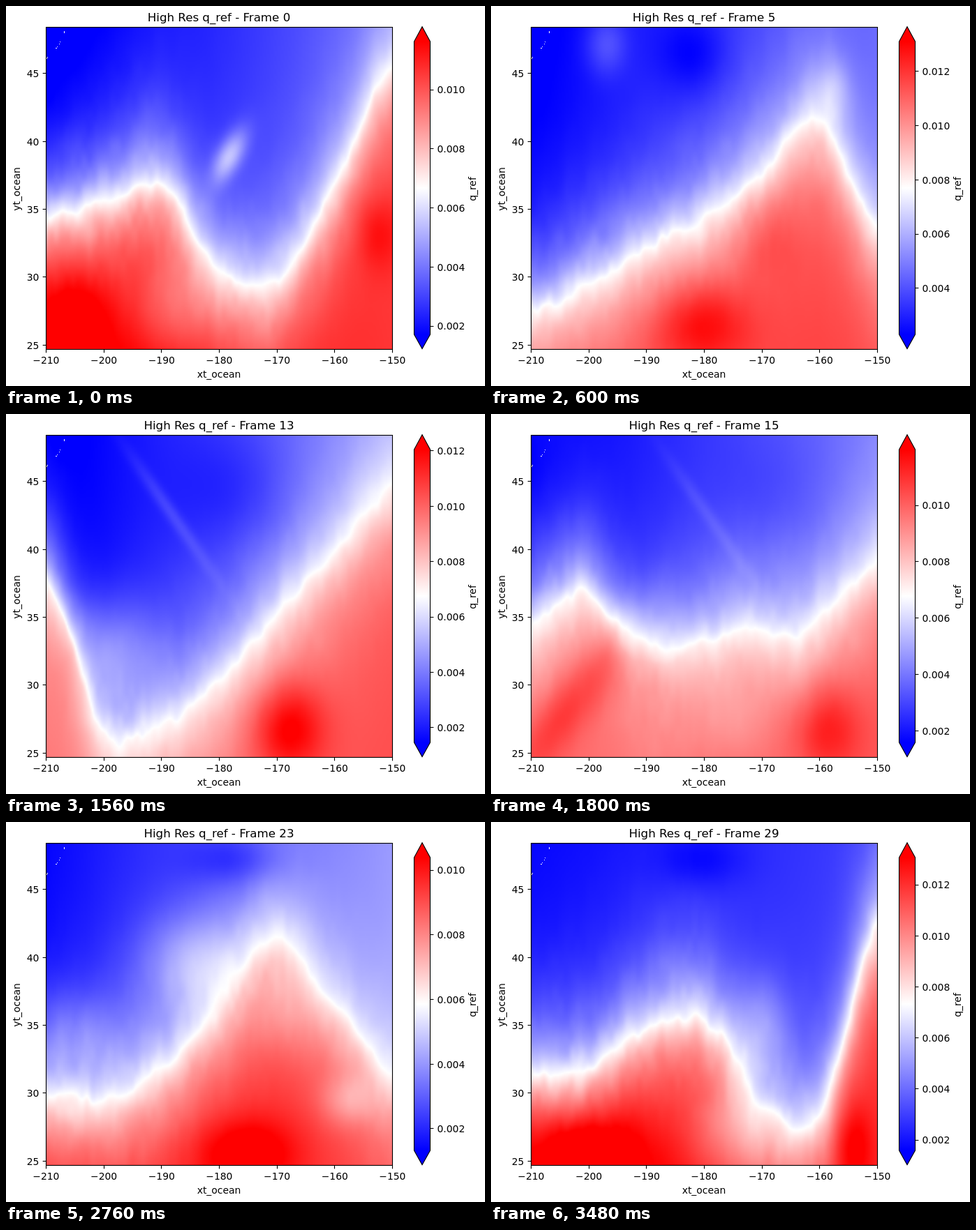
Write an HTML page with a canvas that moves like this. It is 686x545 px and loops after 3600 ms.

```html
<!DOCTYPE html>
<html lang="en">
<head>
<meta charset="utf-8">
<title>High Res q_ref</title>
<style>
  html, body { margin: 0; width: 100%; height: 100%; overflow: hidden; background: #fff; }
  canvas { position: absolute; left: 57px; top: 30px; width: 496px; height: 462px; }
  svg { position: absolute; left: 0; top: 0; }
  text { font: 13.89px "DejaVu Sans", sans-serif; }
  .title { font-size: 16.67px; }
  .mid { text-anchor: middle; }
  .end { text-anchor: end; }
  .line { fill: none; stroke: #000; stroke-width: 1.11; }
</style>
</head>
<body>
<canvas id="field" width="248" height="231"></canvas>
<svg width="686" height="545">
  <defs>
    <linearGradient id="bwr" gradientUnits="userSpaceOnUse" x1="0" y1="51" x2="0" y2="471">
      <stop offset="0" stop-color="#f00"/><stop offset=".5" stop-color="#fff"/><stop offset="1" stop-color="#00f"/>
    </linearGradient>
  </defs>
  <path fill="#fff" d="M57 76h1v3h-1zM58 74h1v2h-1zM59 73h1v1h-1zM71 60h2v1h-2zM73 58h1v1h-1zM76 54h1v1h-1zM77 51h1v1h-1zM83 36h1v3h-1z"/>
  <rect class="line" x="57.5" y="30.5" width="496" height="462"/>
  <path class="line" style="fill:url(#bwr)" d="M584.5 51 596 29.7 607.5 51V471L596 491.7 584.5 471Z"/>
  <g id="axes"></g>
  <g id="bar"></g>
  <text class="title mid" id="title" x="305" y="22"></text>
  <text class="mid" x="305" y="533">xt_ocean</text>
  <text class="mid" transform="translate(20 262.5) rotate(-90)">yt_ocean</text>
  <text class="mid" transform="translate(673 262.5) rotate(-90)">q_ref</text>
</svg>
<script>
const STEP = 120, FRAMES = 30, W = 248, H = 231;
const LEFT = 57, RIGHT = 553, GAP = (RIGHT - LEFT) / 6;
const SPEED = 36;                        // eastward travel per frame, px
const COLD_DEPTH = 85, WARM_DEPTH = 90;  // how fast the air changes away from the front, px

const $ = id => document.getElementById(id);
const clamp = (v, a, b) => Math.max(a, Math.min(b, v));
const mix = (a, b, t) => a + (b - a) * t;

// front: height of the white line at each longitude tick.
// cold, warm: strength of the air above and below it at the west and east edges.
// blobs: x, y, rx, ry, amount, shear.
const poses = [
  { frame: 0, range: [1.72, 11.63], front: [305, 283, 257, 377, 390, 258, 85], cold: [1.15, .55], warm: [1.2, .8],
    blobs: [[320, 215, 20, 38, .5, -.4], [235, 430, 55, 75, -.3], [95, 450, 45, 70, .25], [535, 325, 35, 55, .2]] },
  { frame: 5, range: [2.3, 13.1], front: [440, 397, 350, 308, 240, 168, 315], cold: [1.05, .6], warm: [.75, .75],
    blobs: [[300, 455, 65, 60, .35], [290, 70, 50, 60, -.2], [165, 55, 30, 45, .25], [490, 120, 25, 45, .2], [395, 330, 40, 60, .15]] },
  { frame: 9, range: [2.36, 11], front: [318, 272, 243, 377, 345, 297, 232], cold: [1.1, .72], warm: [1, 1.4],
    blobs: [[260, 440, 90, 80, -.42], [262, 225, 28, 40, .3]] },
  { frame: 13, range: [1.47, 12.05], front: [245, 458, 448, 385, 290, 195, 105], cold: [1.1, .4], warm: [.55, .7],
    blobs: [[405, 450, 50, 65, .45], [150, 340, 70, 80, .35], [330, 110, 90, 90, -.15], [235, 140, 12, 85, .15, .68]] },
  { frame: 18, range: [1.76, 11.88], front: [385, 365, 282, 213, 182, 180, 330], cold: [1, .6], warm: [.7, .65],
    blobs: [[238, 400, 42, 110, .55, -.65], [460, 440, 40, 50, -.22], [320, 400, 40, 80, .15], [95, 440, 30, 25, -.2], [130, 90, 90, 70, -.15]] },
  { frame: 23, range: [1.33, 10.39], front: [395, 397, 355, 270, 172, 255, 360], cold: [1, .4], warm: [1, .75],
    blobs: [[345, 475, 70, 50, .35], [395, 270, 60, 70, -.2], [490, 400, 40, 35, -.25], [270, 200, 80, 70, .35], [330, 55, 70, 35, -.2], [100, 300, 80, 60, .2]] },
  { frame: 29, range: [1.59, 13.07], front: [362, 353, 294, 284, 390, 415, 150], cold: [1, .75], warm: [1.25, .85],
    blobs: [[130, 465, 70, 50, .35], [345, 450, 70, 80, -.35], [520, 465, 25, 60, .25], [385, 290, 40, 70, .25], [300, 55, 60, 40, -.15]] }
];

const hash = (x, y) => {
  const s = Math.sin(x * 127.1 + y * 311.7) * 43758.5453;
  return s - Math.floor(s);
};
function noise(x, y) {
  const i = Math.floor(x), j = Math.floor(y), ease = t => t * t * (3 - 2 * t);
  const u = ease(x - i), v = ease(y - j);
  return mix(mix(hash(i, j), hash(i + 1, j), u), mix(hash(i, j + 1), hash(i + 1, j + 1), u), v) - .5;
}

// Catmull-Rom spline through evenly spaced values.
function spline(ys, c) {
  const i = Math.min(ys.length - 2, Math.floor(c)), f = c - i;
  const [p, q, r, s] = [-1, 0, 1, 2].map(k => ys[clamp(i + k, 0, ys.length - 1)]);
  return q + f / 2 * (r - p + f * (2 * p - 5 * q + 4 * r - s + f * (3 * (q - r) + s - p)));
}

// Front height, cold strength and warm strength at x.
function column(pose, x) {
  const c = clamp((x - LEFT) / GAP, 0, 6);
  return [spline(pose.front, c), mix(...pose.cold, c / 6), mix(...pose.warm, c / 6)];
}

const bump = (blobs, x, y) => blobs.reduce((sum, [bx, by, rx, ry, amount, shear = 0]) => {
  const dy = y - by, u = (x - bx - shear * dy) / rx, v = dy / ry, d = u * u + v * v;
  return d < 7 ? sum + amount * Math.exp(-d) : sum;
}, 0);

const ctx = $("field").getContext("2d"), img = ctx.createImageData(W, H);

function drawField(a, b, t, n) {
  const goneA = SPEED * (n - a.frame), goneB = SPEED * (n - b.frame);
  for (let i = 0; i < W; i++) {
    const x = LEFT + 1 + i * 2, xa = x - goneA, xb = x - goneB;
    // Trust the pose that still has data upstream or downstream of this column.
    const wa = (1 - t) / (1 + Math.max(0, LEFT - xa) / 50);
    const wb = t / (1 + Math.max(0, xb - RIGHT) / 50);
    const w = wb / (wa + wb), colB = column(b, xb);
    const [front, cold, warm] = column(a, xa).map((v, k) => mix(v, colB[k], w));
    for (let j = 0; j < H; j++) {
      const y = 31 + j * 2, nx = x - n * SPEED;
      const d = y - front + 14 * noise(nx / 17, y / 48) + 7 * noise(nx / 8 + 40, y / 22);
      let v = d < 0 ? cold * (Math.exp(d / COLD_DEPTH) - 1) : warm * (1 - Math.exp(-d / WARM_DEPTH));
      if (w < 1) v += (1 - w) * bump(a.blobs, xa, y);
      if (w > 0) v += w * bump(b.blobs, xb, y);
      v = clamp(v, -1, 1);
      const fade = 255 * (1 - Math.abs(v));
      img.data.set([v < 0 ? fade : 255, fade, v > 0 ? fade : 255, 255], (j * W + i) * 4);
    }
  }
  ctx.putImageData(img, 0, 0);
}

const label = (x, y, text, cls = "") => `<text class="${cls}" x="${x}" y="${Math.round(y)}">${text}</text>`;
const tick = (x, y, dir) => `<path class="line" d="M${Math.floor(x) + .5} ${Math.floor(y) + .5}${dir}"/>`;

function drawAxes() {
  let out = "";
  for (let k = 0; k <= 6; k++) {
    const x = LEFT + .4 + k * GAP;
    out += tick(x, 492, "v4.9") + label(x, 513, "\u2212" + (210 - k * 10), "mid");
  }
  for (let v = 25; v <= 45; v += 5) {
    const y = 486.2 - (v - 25) * 19.46;
    out += tick(LEFT, y, "h-4.9") + label(47.3, y + 5.3, v, "end");
  }
  $("axes").innerHTML = out;
}

function drawBar(lo, hi) {
  const step = hi - lo < 9 ? 1 : 2;
  let out = "";
  for (let v = Math.ceil(lo / step) * step; v <= hi + .01; v += step) {
    const y = 471 - (v - lo) / (hi - lo) * 420;
    out += tick(607, y, "h4.9") + label(617.5, y + 5.3, (v / 1000).toFixed(3));
  }
  $("bar").innerHTML = out;
}

function draw(n) {
  const k = Math.max(1, poses.findIndex(p => p.frame >= n));
  const a = poses[k - 1], b = poses[k], t = (n - a.frame) / (b.frame - a.frame);
  $("title").textContent = "High Res q_ref - Frame " + n;
  drawBar(...a.range.map((v, i) => mix(v, b.range[i], t)));
  drawField(a, b, t, n);
}

let shown = -1;
const start = performance.now();
function loop() {
  const n = Math.floor((performance.now() - start) / STEP) % FRAMES;
  if (n !== shown) draw(shown = n);
  requestAnimationFrame(loop);
}
drawAxes();
loop();
</script>
</body>
</html>
```
